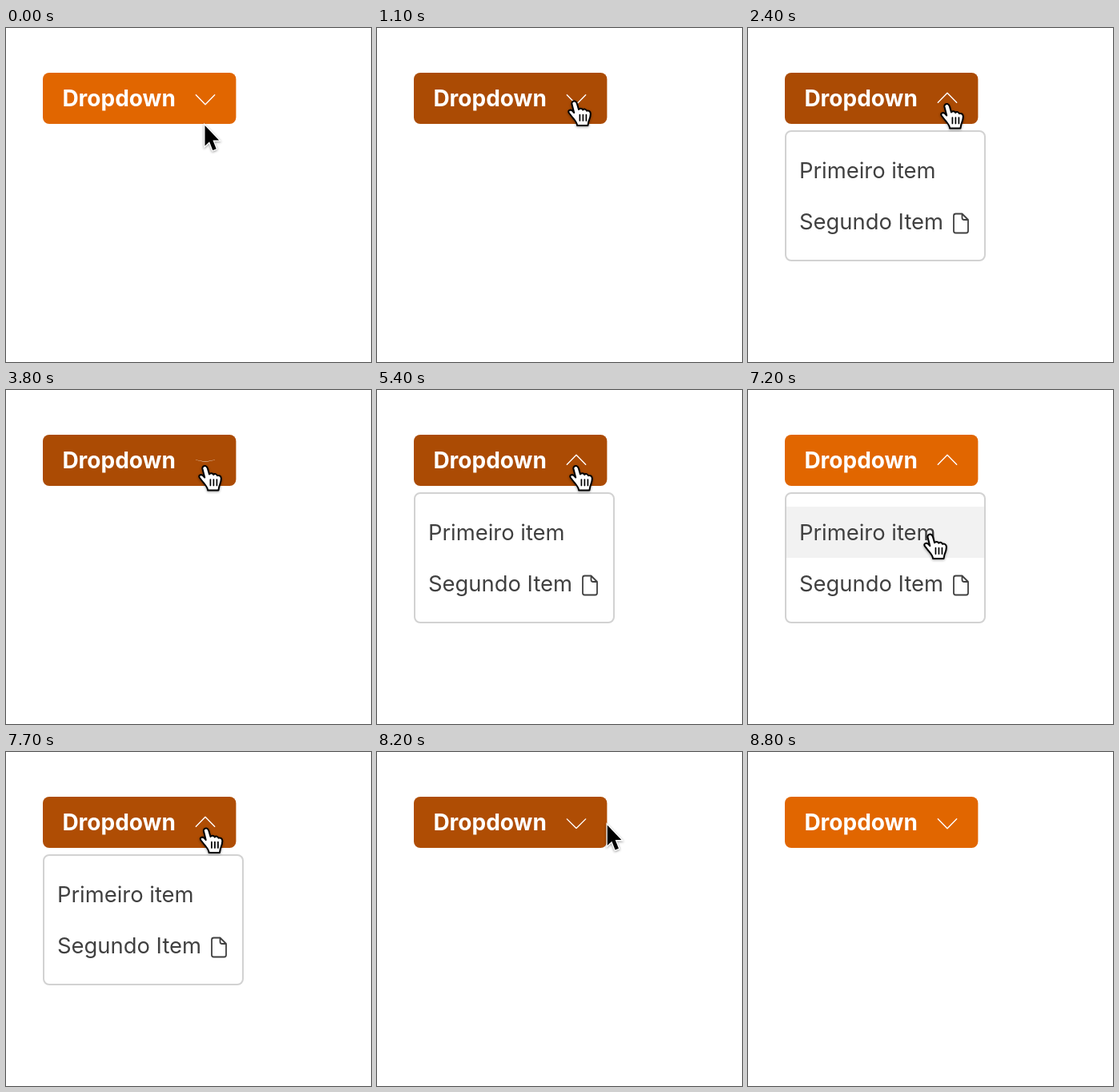
These frames come from a looping animation (456 by 418 pixels, 9.4 s). An HTML page:

```html
<!DOCTYPE html>
<html lang="pt">
<head>
<meta charset="utf-8">
<title>Dropdown</title>
<style>
  html, body { margin: 0; width: 100%; height: 100%; overflow: hidden; background: #fff; }
  svg { display: block; width: 456px; height: 418px; }
  text { font: 400 27.4px Inter, Roboto, sans-serif; fill: #404040; }
  .label { font-weight: 700; font-size: 28px; fill: #fff; }
  .line { fill: none; stroke-linecap: round; stroke-linejoin: round; }
  .cursor { filter: drop-shadow(0 1.5px 1.5px rgba(0, 0, 0, .4)); }
</style>
</head>
<body>
<svg viewBox="0 0 456 418">
  <rect id="button" x="46" y="56" width="241.4" height="64" rx="8"/>
  <text class="label" x="70.4" y="98">Dropdown</text>
  <g transform="translate(249 88.5)">
    <path id="chevron" class="line" d="M-11.7 -4.8L0 7.2L11.7 -4.8" stroke="#fff" stroke-width="1.4"/>
  </g>

  <g id="menu">
    <rect x="47" y="129" width="249" height="162" rx="7" fill="#fff" stroke="#d2d2d2" stroke-width="2"/>
    <rect id="row" x="48" width="247" height="64" fill="#f2f2f2"/>
    <text x="64" y="188">Primeiro item</text>
    <text x="64" y="252">Segundo Item</text>
    <path class="line" stroke="#404040" stroke-width="1.8"
      d="M267.5 232.5H259.5Q257 232.5 257 235V254Q257 256.5 259.5 256.5H272.5Q275 256.5 275 254V240ZV237.5Q267.5 240 270 240H275"/>
  </g>

  <g id="arrow" class="cursor">
    <path d="M0 0V25.5L5.6 20.2L9.8 31L14.2 29.2L9.9 18.6H17.6Z" fill="#000" stroke="#fff" stroke-width="2.6" paint-order="stroke"/>
  </g>
  <g id="hand" class="cursor">
    <path fill="#fff" stroke="#000" stroke-width="2" stroke-linejoin="round"
      d="M-3.6 4C-4 1 -1 0 .5 .6C2 1.2 2.6 2.5 3 4L5 11C6 9.5 9 9.3 10.2 11.5C11.5 10 14 10.3 15 12.7C17 11.8 19.6 13 19.8 16C20 20 18.5 23 17.4 26L16.4 31H3.2C2.8 28 1 25.5 -1 23C-3.2 20.5 -5 18 -7 15.5C-9 12.5 -6 10.5 -3 12.5L-.8 15Z"/>
    <path class="line" d="M6.4 17.5V25M10.4 17.5V25M14.4 17.5V25" stroke="#000" stroke-width="1.7"/>
  </g>
</svg>
<script>
  const LOOP = 9400, TICK = 100, FADE = 300;
  const ORANGE = [225, 102, 0], BROWN = [171, 75, 4];

  // Times that toggle a state, starting from "off"
  const clicks = [1815, 3715, 5015, 8015];
  const hovers = [790, 5930, 7505, 8190];
  const focus = 800, exit = 8400;

  // Pointer moves: begin, end, and the place reached
  const home = [248.5, 122];
  const moves = [
    [0, 400, 247, 91],
    [2200, 2400, 249, 94.5],
    [2800, 3100, 249, 99],
    [3200, 3300, 249, 94.5],
    [5700, 6600, 212, 241],
    [6800, 7700, 250.5, 95],
    [8050, 8350, 325, 88]
  ];

  const $ = id => document.getElementById(id);
  const mix = (a, b, p) => a + (b - a) * p;
  const clamp = p => Math.max(0, Math.min(1, p));
  const smooth = p => p * p * (3 - 2 * p);
  const settle = p => 1 - (1 - p) ** 2.5;
  const show = (id, on) => $(id).setAttribute('visibility', on ? 'visible' : 'hidden');

  // A toggled state and its eased 0..1 level
  function toggle(times, t) {
    const past = times.filter(s => s <= t);
    const on = past.length % 2 === 1;
    const p = past.length ? settle(clamp((t - past.pop()) / FADE)) : 1;
    return { on, level: on ? p : 1 - p };
  }

  function pointer(t) {
    return moves.reduce(([x, y], [begin, end, toX, toY]) => {
      const p = smooth(clamp((t - begin) / (end - begin)));
      return [mix(x, toX, p), mix(y, toY, p)];
    }, home);
  }

  function draw(t) {
    const [x, y] = pointer(t);
    const hover = toggle(hovers, t), menu = toggle(clicks, t);
    const color = ORANGE.map((c, i) => Math.round(mix(c, BROWN[i], hover.level)));
    $('button').setAttribute('fill', `rgb(${color})`);
    $('chevron').setAttribute('transform', `scale(1 ${Math.cos(Math.PI * menu.level)})`);

    show('menu', menu.on);
    show('row', menu.on && y >= 146);
    $('row').setAttribute('y', y < 210 ? 146 : 210);

    const hand = t >= focus && x < 287;
    show('hand', hand);
    show('arrow', !hand && t < exit);
    $(hand ? 'hand' : 'arrow').setAttribute('transform', `translate(${x} ${y})`);
  }

  const start = performance.now();
  function frame() {
    const t = (performance.now() - start) % LOOP;
    draw(Math.floor(t / TICK) * TICK);
    requestAnimationFrame(frame);
  }
  frame();
</script>
</body>
</html>
```
